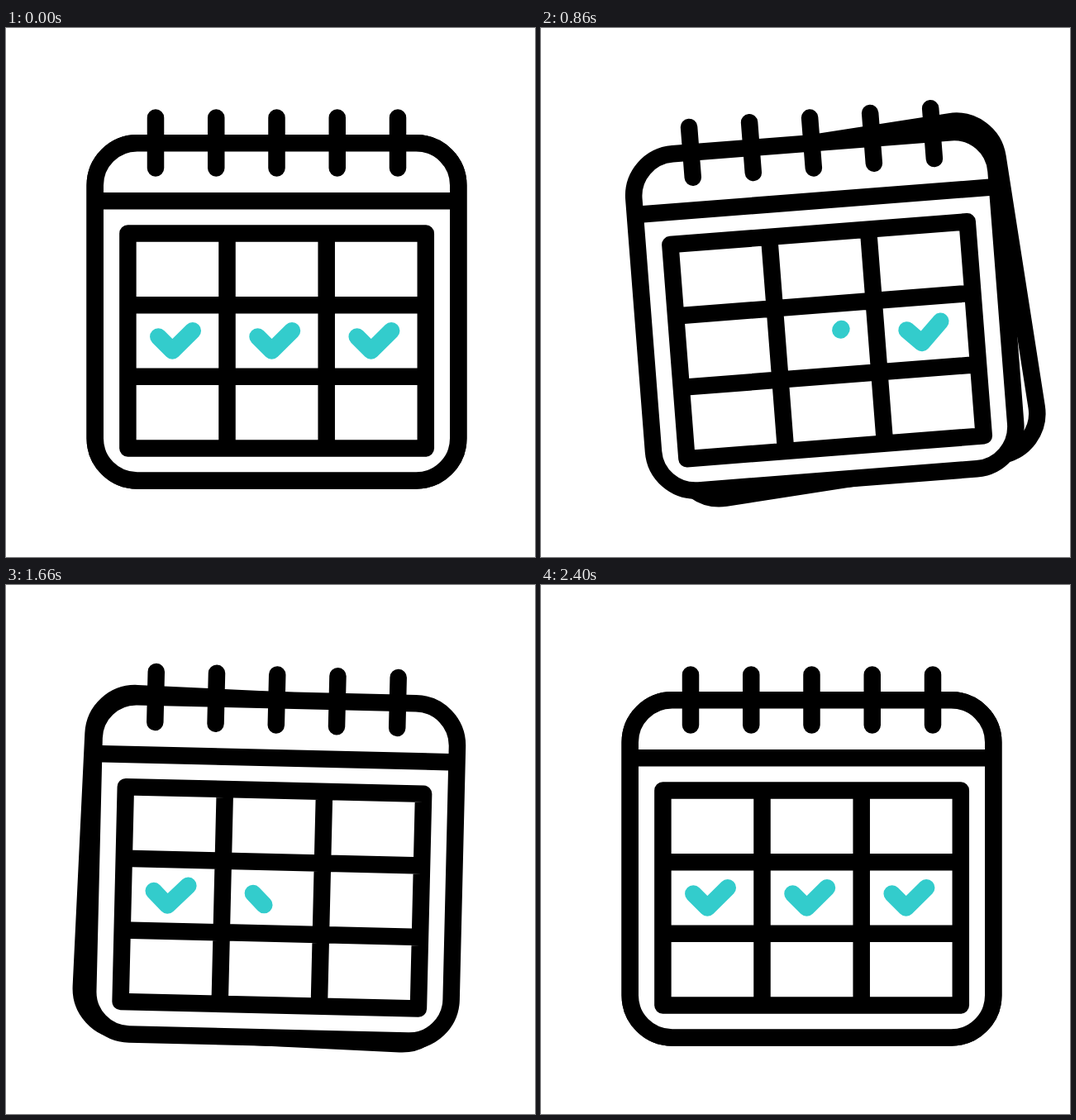
An HTML page for the animation above (2.42 s loop, 640x640 px).

```html
<!DOCTYPE html>
<html lang="en">
<head>
<meta charset="utf-8">
<title>Calendar</title>
<style>
  html, body { margin: 0; width: 100%; height: 100%; overflow: hidden; background: #fff; }
  svg { display: block; width: 100%; height: 100%; }
  .ink { stroke: #000; stroke-width: 20.5; fill: none; }
  .page { fill: #fff; }
  .pins { stroke-linecap: round; }
  .grid { stroke-linejoin: round; }
  .check { stroke: #3cc; stroke-width: 20.5; fill: none; stroke-linecap: round; stroke-linejoin: round; }
</style>
</head>
<body>
<svg viewBox="0 0 640 640">
  <g id="back">
    <rect class="ink page" x="107.75" y="139.25" width="439.5" height="408.3" rx="51"/>
  </g>
  <g id="front">
    <rect class="ink page" x="107.75" y="139.25" width="439.5" height="408.3" rx="51"/>
    <path class="ink" d="M107.75 209.2H547.25"/>
    <path class="ink pins" d="M181 108.5v61M254.25 108.5v61M327.5 108.5v61M400.75 108.5v61M474 108.5v61"/>
    <path class="ink grid" d="M147.4 248.5H507.8V508.4H147.4ZM267.5 248.5V508.4M387.7 248.5V508.4M147.4 335.2H507.8M147.4 421.8H507.8"/>
    <path class="check" pathLength="1" d="M184.3 373.6l17 17l24.5 -24.4"/>
    <path class="check" pathLength="1" d="M304.5 373.6l17 17l24.5 -24.4"/>
    <path class="check" pathLength="1" d="M424.7 373.6l17 17l24.5 -24.4"/>
  </g>
</svg>
<script>
const LOOP = 2420;
const SWING = 480;
const TRACE = 440;
const angles = [0, 8, -6, 4, -2, 0];
// when each check starts to vanish and to be drawn again
const checkTimes = [[55, 1100], [466, 1490], [875, 1880]];

const back = document.getElementById('back');
const front = document.getElementById('front');
const checks = document.querySelectorAll('.check');

const ease = p => {
  p = Math.min(1, Math.max(0, p));
  return p * p * (3 - 2 * p);
};

function angleAt(t) {
  const i = Math.min(angles.length - 2, Math.floor(t / SWING));
  return angles[i] + (angles[i + 1] - angles[i]) * ease(t / SWING - i);
}

function rotate(el, deg) {
  el.setAttribute('transform', `rotate(${deg} 327.5 139.25)`);
}

function trim(el, from, to) {
  el.style.visibility = to > from ? 'visible' : 'hidden';
  el.style.strokeDasharray = `${to - from} 2`;
  el.style.strokeDashoffset = -from;
}

function draw(t) {
  const a = angleAt(t);
  rotate(front, a);
  rotate(back, 2 * a);
  checks.forEach((el, i) => {
    const [erase, redraw] = checkTimes[i];
    if (t < redraw) trim(el, ease((t - erase) / TRACE), 1);
    else trim(el, 0, ease((t - redraw) / TRACE));
  });
}

let start;
function tick(now) {
  start ??= now;
  draw((now - start) % LOOP);
  requestAnimationFrame(tick);
}
draw(0);
requestAnimationFrame(tick);
</script>
</body>
</html>
```
